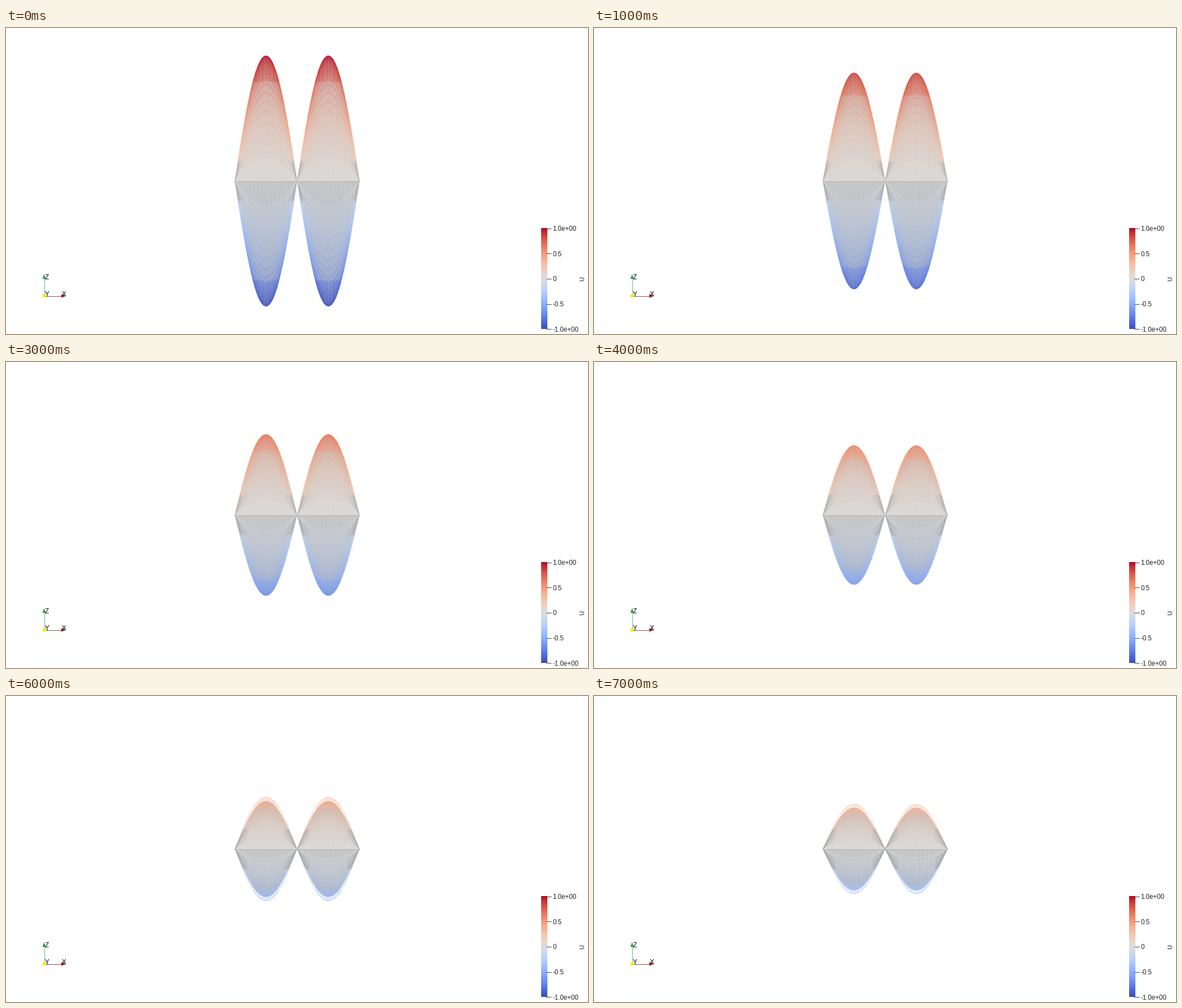
These frames come from a looping animation (1031x543 px, 8 s). A matplotlib script:

```python
import numpy as np
import matplotlib
import matplotlib.pyplot as plt
from matplotlib.animation import FuncAnimation
from matplotlib.collections import LineCollection
from matplotlib.patches import Circle, Polygon

W, H, DPI = 1031, 543, 128
PX = 72 / DPI                     # one pixel in points
LEFT, RIGHT, ZERO = 405.3, 626.2, 271.5
PEAK, DECAY = 222.0, 0.1473       # height in pixels, decay rate per step
N = 64                            # grid cells across the domain
STEPS, STEP_MS = 8, 1000
BOX = (404, 628, 47, 497)         # area holding the surface

matplotlib.rcParams["font.family"] = "Liberation Sans"
cmap = plt.get_cmap("coolwarm")

fig = plt.figure(figsize=(W / DPI, H / DPI), dpi=DPI, facecolor="white")
ax = fig.add_axes([0, 0, 1, 1])
ax.axis("off")


def colour(z):
    return cmap((np.asarray(z) + 1) / 2)


def label(x, y, text, size, **style):
    ax.text(x, y, text, fontsize=size * PX, va="center_baseline", **style)


def line(xs, ys, c, width=1):
    ax.plot(xs, ys, color=c, lw=width * PX, solid_capstyle="butt")


# --- static parts -------------------------------------------------------
def draw_colour_bar():
    ramp = np.linspace(1, 0, 256)[:, None]
    ax.imshow(ramp, cmap=cmap, extent=(948, 959, 534.5, 356), aspect="auto", zorder=1)
    for i, text in enumerate(["1.0e+00", "0.5", "0", "-0.5", "-1.0e+00"]):
        y = 355.7 + i * 44.6
        line([957, 965.5], [y, y], "#444444")
        label(968.5, y, text, 11.5, color="#222222")
    label(1021.3, 445, "U", 11, rotation=90, ha="center", color="#222222")


def draw_orientation_axes():
    line([67.5, 67.5], [475, 443], "#5cc07c")
    line([68, 99], [475.5, 475.5], "#a04a4a")
    ax.add_patch(Polygon([(67.5, 437), (64.5, 445), (70.5, 445)], color="#2a9a3c", lw=0))
    ax.add_patch(Polygon([(106, 475.5), (98, 472.2), (98, 478.8)], color="#a01818", lw=0))
    ax.add_patch(Circle((67.8, 475.3), 3.2, color="#f0ee10", lw=0, zorder=4))
    for x, y, text in [(72.5, 441.2, "Z"), (72.5, 471.7, "Y"), (103, 471.7, "X")]:
        label(x, y, text, 11.5, ha="center", color="black", zorder=5)


# --- surface ------------------------------------------------------------
def join(x, y):
    """Turn polylines (rows of points) into separate segments."""
    points = np.stack([x, y], axis=-1)
    return np.stack([points[:, :-1], points[:, 1:]], axis=2).reshape(-1, 2, 2)


u = np.linspace(0, 1, 2 * N + 1)
wave = np.abs(np.sin(2 * np.pi * u))
to_x = LEFT + u * (RIGHT - LEFT)

fine = np.arange(4, 33) / 2
index = np.array([k for k in fine if k % 1 == 0 or k > 9.5])
index = np.concatenate([index, -index])
rows = np.sin(index * 2 * np.pi / N)
row_mid = np.repeat(np.abs(index), 2 * N)
arc_unit = rows[:, None] * wave[None, :]
arc_z = ((arc_unit[:, :-1] + arc_unit[:, 1:]) / 2).ravel()
arc_wave = np.tile((wave[:-1] + wave[1:]) / 2, len(rows))
half_row = row_mid % 1 != 0

levels = np.linspace(-1, 1, 81)
post_unit = wave[:, None] * levels[None, :]
post_z = ((post_unit[:, :-1] + post_unit[:, 1:]) / 2).ravel()
post_half = np.repeat(np.arange(2 * N + 1) % 2 == 1, len(levels) - 1)

x0, x1, y0, y1 = BOX
px, py = np.meshgrid(np.arange(x0, x1) + 0.5, np.arange(y0, y1) + 0.5)
pixel_wave = np.abs(np.sin(2 * np.pi * (px - LEFT) / (RIGHT - LEFT)))
pixel_wave[(px < LEFT) | (px > RIGHT)] = 0


def fill_image(height, top):
    """Soft tone of the crowded mesh: paler above zero, greyer below and
    towards the silhouette as the surface flattens."""
    dz = ZERO - py
    reach = top * height * pixel_wave
    t = np.clip(np.abs(dz) / np.maximum(reach, 0.1), 0, 1)
    up = dz >= 0
    flat = 1 - height / PEAK
    grey = np.where(up, 0.845, 0.765)
    low = np.abs(dz) < 0.195 * reach
    grey = np.where(low, np.where(up, 0.86, 0.745), grey)
    grey = grey - (0.03 + 0.2 * flat) * t ** 3
    weight = (0.2 + 0.3 * t ** 4)[..., None]
    tint = colour(dz / PEAK)[..., :3]
    rgb = grey[..., None] * (1 - weight) * np.array([1, 0.995, 0.985]) + weight * tint
    alpha = np.clip(reach - np.abs(dz) + 0.5, 0, 1)
    return np.dstack([rgb, alpha])


def arc_colours(height, open_from):
    z = arc_z * height / PEAK
    rgba = colour(z)
    rgba[:, 3] = 0.6
    corner = ((np.abs(arc_z) * height < 36) & (arc_wave < 0.6)
              & (row_mid > 3.5) & (row_mid < 14) & ~half_row)
    rgba[corner] = (0.5, 0.5, 0.5, 0.22)
    rgba[half_row & (np.abs(arc_z) < 0.79), 3] = 0
    rgba[(row_mid > open_from) & (row_mid < 16), 3] = 0
    rgba[row_mid == 16, 3] = 0.85
    return rgba


def post_colours(height):
    z = post_z * height / PEAK
    rgba = colour(z)
    cap = np.abs(post_z) > 0.79
    rgba[:, :3] = np.where(cap[:, None], rgba[:, :3], 0.5 * rgba[:, :3] + 0.42)
    rgba[:, 3] = np.where(cap, 0.65, np.where(z > 0, 0.3, 0.6))
    rgba[~cap & (z > 0), :3] *= 0.92
    rgba[post_half & ~cap, 3] = 0
    return rgba


draw_colour_bar()
draw_orientation_axes()
fill = ax.imshow(fill_image(PEAK, 1), extent=(x0, x1, y1, y0), aspect="auto",
                 interpolation="nearest", zorder=1)
posts = ax.add_collection(LineCollection([], linewidths=0.9 * PX, zorder=2))
arcs = ax.add_collection(LineCollection([], linewidths=0.9 * PX, zorder=3))
ax.plot([LEFT, RIGHT], [ZERO, ZERO], color="#b4b4b4", lw=PX, zorder=4)
ax.set_xlim(0, W)
ax.set_ylim(H, 0)


def update(step):
    height = PEAK * np.exp(-DECAY * step)
    # the mesh near the crests coarsens late in the run
    open_from = 16 if step < 5 else 14 if step == 5 else 12
    top = np.sin(open_from * 2 * np.pi / N)
    fill.set_data(fill_image(height, top))
    arcs.set_segments(join(np.tile(to_x, (len(rows), 1)), ZERO - height * arc_unit))
    arcs.set_color(arc_colours(height, open_from))
    posts.set_segments(join(np.tile(to_x[:, None], (1, len(levels))),
                            ZERO - height * post_unit))
    posts.set_color(post_colours(height))
    return fill, posts, arcs


animation = FuncAnimation(fig, update, frames=STEPS, interval=STEP_MS,
                          repeat=True, repeat_delay=0, blit=False)
plt.show()
```
